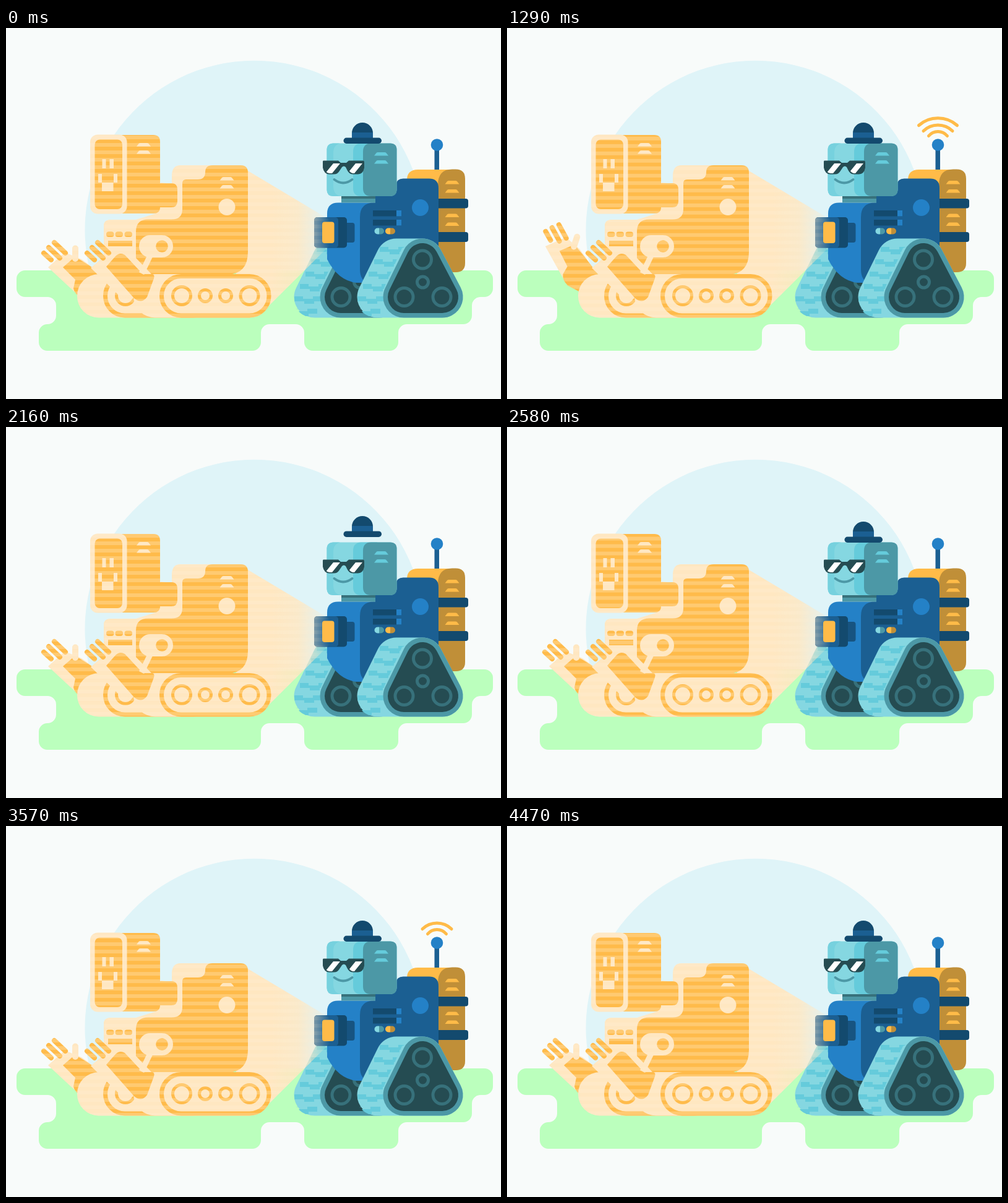
An HTML page for the animation above (4.5 s loop, 800 by 600 pixels).

```html
<!DOCTYPE html>
<html lang="en">
<head>
<meta charset="utf-8">
<title>Robot projector</title>
<style>
html, body { margin: 0; width: 100%; height: 100%; overflow: hidden; background: #f8fbfa; }
svg { display: block; width: 100vw; height: 100vh; }
.or { fill: #ffbb4a } .li { fill: #ffe7c1 }
.orl { stroke: #ffbb4a; fill: none } .lil { stroke: #ffe7c1; fill: none }
.blue { fill: #2481c7 } .deep { fill: #1b5f92 } .navy { fill: #134a6e }
.sky { fill: #85d7e1 } .aqua { fill: #65cbdb } .teal { fill: #4c98a6 } .ink { fill: #254c52 }
.gold { fill: #ffbb48 } .bronze { fill: #c08f38 }
.rd { stroke-linecap: round; stroke-linejoin: round }
</style>
</head>
<body>
<svg viewBox="0 0 800 600" preserveAspectRatio="xMidYMid meet">
  <defs>
    <linearGradient id="fade" gradientUnits="userSpaceOnUse" x1="430" x2="523" y1="0" y2="0">
      <stop offset="0" stop-color="#ffe7c1"/>
      <stop offset=".45" stop-color="#ffe7c1" stop-opacity=".85"/>
      <stop offset="1" stop-color="#ffe7c1" stop-opacity="0"/>
    </linearGradient>
    <pattern id="lines" width="20" height="12" patternUnits="userSpaceOnUse">
      <rect width="20" height="6" fill="#fff0d8" opacity=".28"/>
    </pattern>
    <mask id="shape" maskUnits="userSpaceOnUse" x="0" y="0" width="800" height="600" style="mask-type:alpha">
      <use href="#holo"/>
    </mask>
    <clipPath id="tread"><path d="M568 435 L601 358 Q611 341 631 341 H675 L640 356 L612 418 Q604 440 622 469 H601 Q568 467 568 435Z"/></clipPath>
    <clipPath id="lenses"><path d="M515 219H540L536 230Q533 235 527 235H523Q516 234 515 227ZM551 219H576V227Q575 234 569 235H562Q557 235 554 230Z"/></clipPath>
    <path id="slot" d="M0 5.500L3.500 1Q4.500 0 6 0H17Q18.500 0 19.500 1L23 5.500Z"/>
    <g id="track">
      <path d="M601 435L631 374H673L705 435Z" fill="#85d7e1" stroke="#85d7e1" stroke-width="67" stroke-linejoin="round"/>
      <g class="aqua treads" clip-path="url(#tread)"></g>
      <path d="M643 435L673 374L705 435Z" fill="#4c98a6" stroke="#4c98a6" stroke-width="67" stroke-linejoin="round"/>
      <path d="M643 435L673 374L705 435Z" fill="#254c52" stroke="#254c52" stroke-width="52" stroke-linejoin="round"/>
      <g fill="none" stroke="#37717b" stroke-width="5">
        <circle cx="673" cy="374.500" r="14.500"/><circle cx="643.500" cy="435" r="14.500"/>
        <circle cx="704.500" cy="435" r="14.500"/><circle cx="673.500" cy="411" r="9"/>
      </g>
    </g>
    <g id="belt">
      <rect class="li" x="206" y="398" width="222" height="70.500" rx="35"/>
      <rect class="orl" x="251.500" y="401.500" width="173.500" height="63.500" rx="31.500" stroke-width="7"/>
      <g class="orl" stroke-width="5">
        <circle cx="284" cy="433" r="14.500"/><circle cx="322" cy="433" r="9.500"/>
        <circle cx="355" cy="433" r="9.500"/><circle cx="393.500" cy="433" r="14.500"/>
      </g>
    </g>
    <path id="fingers" class="orl rd" stroke-width="8" d="M61 364L73 375M69 355L87 372M78 347L96 364"/>
  </defs>

  <rect width="800" height="600" fill="#f8fbfa"/>
  <path fill="#dff4f8" d="M137.500 400A274 274 0 1 1 665.500 400Z"/>
  <path fill="#bbffbd" d="M31 392H773a14 14 0 0 1 14 14V421a14 14 0 0 1-14 14H767a14 14 0 0 0-14 14V465a14 14 0 0 1-14 14H648a14 14 0 0 0-14 14V508a14 14 0 0 1-14 14H496a14 14 0 0 1-14-14V493a14 14 0 0 0-14-14H426a14 14 0 0 0-14 14V508a14 14 0 0 1-14 14H67a14 14 0 0 1-14-14V493a14 14 0 0 1 14-14a14 14 0 0 0 14-14V449a14 14 0 0 0-14-14H31a14 14 0 0 1-14-14V406a14 14 0 0 1 14-14Z"/>

  <!-- backpack and antenna -->
  <g id="waves" class="rd" fill="none" stroke="#ffbb48" stroke-width="5"></g>
  <rect class="deep" x="692.500" y="194" width="7.500" height="36"/>
  <circle class="blue" cx="696.500" cy="189" r="9.800"/>
  <path class="gold" d="M648 262V246Q648 229 666 229H728V395H648Z"/>
  <path class="bronze" d="M698 254Q698 228.500 721 228.500H727Q742 228.500 742 244V380Q742 395 727 395H698Z"/>
  <g class="gold">
    <use href="#slot" x="709.500" y="247"/><use href="#slot" x="709.500" y="261"/>
    <use href="#slot" x="709.500" y="300.500"/><use href="#slot" x="709.500" y="314.500"/>
  </g>
  <rect class="navy" x="690" y="276" width="57" height="15.500" rx="4"/>
  <rect class="navy" x="690" y="330" width="57" height="16" rx="4"/>

  <!-- body -->
  <use href="#track" x="-102"/>
  <path class="blue" d="M519 300Q519 282.500 537 282.500H600V412H566Q536 408 519 374Z"/>
  <path class="deep" d="M572 306Q572 282.500 595 282.500H597V268H630V254Q631 243.500 642 243.500H684Q699 243.500 699 259V395H640L585 412Q572 408 572 390Z"/>
  <g id="bars"></g>
  <path class="sky" d="M603 323.500H600.500a5 5 0 0 0 0 10H603Z"/><path class="teal" d="M603 323.500H606a5 5 0 0 1 0 10H603Z"/>
  <path class="gold" d="M621 323.500H618a5 5 0 0 0 0 10H621Z"/><path class="bronze" d="M621 323.500H624a5 5 0 0 1 0 10H621Z"/>
  <circle class="blue" cx="669.500" cy="290.500" r="13.500"/>
  <use href="#track"/>

  <!-- projector -->
  <rect x="545" y="315" width="18.500" height="32" rx="4" fill="#175481"/>
  <rect class="navy" x="498" y="306" width="53" height="49.500" rx="5"/>
  <rect class="deep" x="498" y="306" width="39" height="49.500" rx="5"/>

  <!-- head -->
  <rect class="teal" x="542" y="268" width="55" height="14.500"/>
  <rect x="542" y="268" width="55" height="8" fill="#37717b"/>
  <g id="head">
    <rect class="sky" x="518.500" y="186.500" width="113" height="85.500" rx="10"/>
    <path d="M529 186.500H540Q529 189 529 202V257Q529 269 540 272H529Q518.500 272 518.500 262V197Q518.500 186.500 529 186.500Z" fill="#76d1de"/>
    <path class="aqua" d="M561 200Q561 187 574 186.500H600V272H574Q561 272 561 259Z"/>
    <path class="teal" d="M577 200Q577 186.500 590 186.500H621Q631.500 186.500 631.500 197V261Q631.500 272 621 272H590Q577 272 577 259Z"/>
    <use href="#slot" class="aqua" x="595" y="201"/><use href="#slot" class="aqua" x="595" y="214"/>
    <path class="ink" d="M513 214.500H537L541 218H550L554 214.500H577Q579 214.500 579 217V226Q577 236.500 569 236.500H561Q555 236.500 552 231L549 225Q546 222 543 225L539 231Q536 236.500 530 236.500H522Q514 236 512 226V216Q512 214.500 513 214.500Z"/>
    <g clip-path="url(#lenses)">
      <path id="glare" fill="#fff" d="M516 235L529 219H540L527 235ZM552 235L565 219H576L563 235Z"/>
    </g>
    <path d="M530.500 245Q545 256 559.500 245" fill="none" class="rd" stroke="#4c98a6" stroke-width="3.800"/>
  </g>
  <g id="hat">
    <path class="navy" d="M559 180V170a17 17 0 0 1 34 0V180Z"/>
    <rect class="deep" x="559" y="169" width="34" height="10"/>
    <rect class="navy" x="545.500" y="177.500" width="61.500" height="9.500" rx="4.700"/>
  </g>

  <!-- hologram -->
  <g id="holo">
    <path fill="url(#fade)" d="M380 224L391 231L523 310V352L424 450L370 440Z"/>
    <g id="arm">
      <path class="li" d="M68 387L95 363L122 374L150 395L111 427Z"/>
      <use href="#fingers"/>
      <path class="or" d="M92 387L107 374Q113 370 120 375L133 383L165 405L144 440L122 436Q111 431 109 421L112 407Z"/>
      <path class="lil rd" stroke-width="10" d="M112 356.500V373"/>
    </g>
    <path class="li" d="M268 252V237Q269 222 282 222H345V400H158V320Q158 310 170 310H210L242 300L250 250Z"/>
    <use href="#belt" x="-91"/>
    <path class="li" d="M158 345V320Q158 310 170 310H216V365H190Z"/>
    <path class="or" d="M210 329Q210 309.500 230 309.500H268Q285 309.500 285 293V251Q285 245 291 245H310Q322 245 322 233Q322 222 334 222H379Q391 222 391 234V362Q391 398 357 399H236L210 372Z"/>
    <rect class="or" x="162" y="329.500" width="12.500" height="8.500" rx="4"/>
    <rect class="or" x="176.500" y="329.500" width="12.500" height="8.500" rx="4"/>
    <rect class="or" x="191.500" y="329.500" width="12.500" height="8.500" rx="4"/>
    <rect class="or" x="165" y="344" width="39" height="9"/>
    <g class="li">
      <use href="#slot" x="345.500" y="241"/><use href="#slot" x="345.500" y="254"/>
      <circle cx="357" cy="289.500" r="13.500"/>
    </g>
    <path class="or" d="M180 173H238Q249 173 249 184V251H267Q277 251 277 261V280Q277 290 267 290H249Q249 300 238 300H180Z"/>
    <rect class="li" x="136" y="172.500" width="59.500" height="128" rx="12"/>
    <rect class="or" x="143.500" y="180.500" width="44.500" height="112.500" rx="8"/>
    <g class="li">
      <rect x="155.500" y="212" width="6" height="15"/><rect x="167.500" y="212" width="6.500" height="15"/>
      <path d="M149 236H155V250H174V236H180V250H173.500V264H155V250H149Z"/>
      <use href="#slot" x="211" y="186"/><use href="#slot" x="211" y="198"/>
    </g>
    <use href="#belt"/>
    <path class="li" d="M137 388L165 364L190 376L222 400L205 438L184 434Z"/>
    <use href="#fingers" x="70"/>
    <path class="or" d="M162 386L177 369Q184 362 192 367L221 398H236Q241 399 239 405L228 435Q219 447 207 437Z"/>
    <path class="lil" stroke-width="9" d="M235 364L219 397"/>
    <path class="li" d="M233 335H252a18 18 0 0 1 0 36H233a18 18 0 0 1 0-36Z"/>
    <circle class="or" cx="252" cy="353" r="9.800"/>
  </g>
  <rect width="800" height="600" fill="url(#lines)" mask="url(#shape)"/>
  <rect class="gold" x="511" y="313.500" width="19.500" height="34.500" rx="4"/>
</svg>
<script>
const LOOP = 4500;
const NS = 'http://www.w3.org/2000/svg';
const $ = id => document.getElementById(id);

function add(parent, tag, attrs) {
  const el = document.createElementNS(NS, tag);
  for (const k in attrs) el.setAttribute(k, attrs[k]);
  return parent.appendChild(el);
}

// Smooth 0..1 ramp between two times
function ramp(t, a, b) {
  const u = Math.min(1, Math.max(0, (t - a) / (b - a)));
  return u * u * (3 - 2 * u);
}

const shift = (el, x, y) => el.setAttribute('transform', `translate(${x} ${y})`);

// Signal arcs: half width, end height, radius
const arcs = [[15, 174.5, 19.5], [23.5, 166.5, 34], [31, 157.5, 47]].map(([w, y, r]) =>
  add($('waves'), 'path', { d: `M${696.5 - w} ${y}A${r} ${r} 0 0 1 ${696.5 + w} ${y}` }));

for (const y of [295, 310]) {
  add($('bars'), 'rect', { x: 593, y, width: 46, height: 9.5, class: 'navy' });
  add($('bars'), 'rect', { x: 631, y, width: 8, height: 9.5, class: 'blue' });
}

const treads = document.querySelector('.treads');
for (let i = 0; i < 6; i++) {
  const y = 354 + i * 20, x = 604 - i * 9;
  add(treads, 'path', { d: `M${x} ${y}h14v4h16v-4h16v8h-14v4h-16v-4h-16z` });
}

// Number of lit arcs for each of the two pulses
function signal(t) {
  const start = t < 2400 ? 300 : 2735;
  const n = Math.floor((t - start) / 465) + 1;
  return n > 0 && n < 4 ? n : 0;
}

function draw(t) {
  const lit = signal(t);
  arcs.forEach((a, i) => a.setAttribute('visibility', i < lit ? 'visible' : 'hidden'));

  const wave = 18 * (ramp(t, 150, 750) - ramp(t, 1560, 2160));
  $('arm').setAttribute('transform', `rotate(${wave} 172 351)`);

  const nod = ramp(t, 1400, 1700) - ramp(t, 1800, 2100);
  shift($('head'), 0, 10 * nod);
  shift($('glare'), -6 * nod, 0);
  const u = Math.min(1, Math.max(0, (t - 2070) / 450));
  shift($('hat'), 0, 10 * nod - 56 * u * (1 - u));

  $('lines').setAttribute('patternTransform', `translate(0 ${6 + t / LOOP * 48})`);
}

function tick() {
  draw(performance.now() % LOOP);
  requestAnimationFrame(tick);
}
tick();
</script>
</body>
</html>
```
